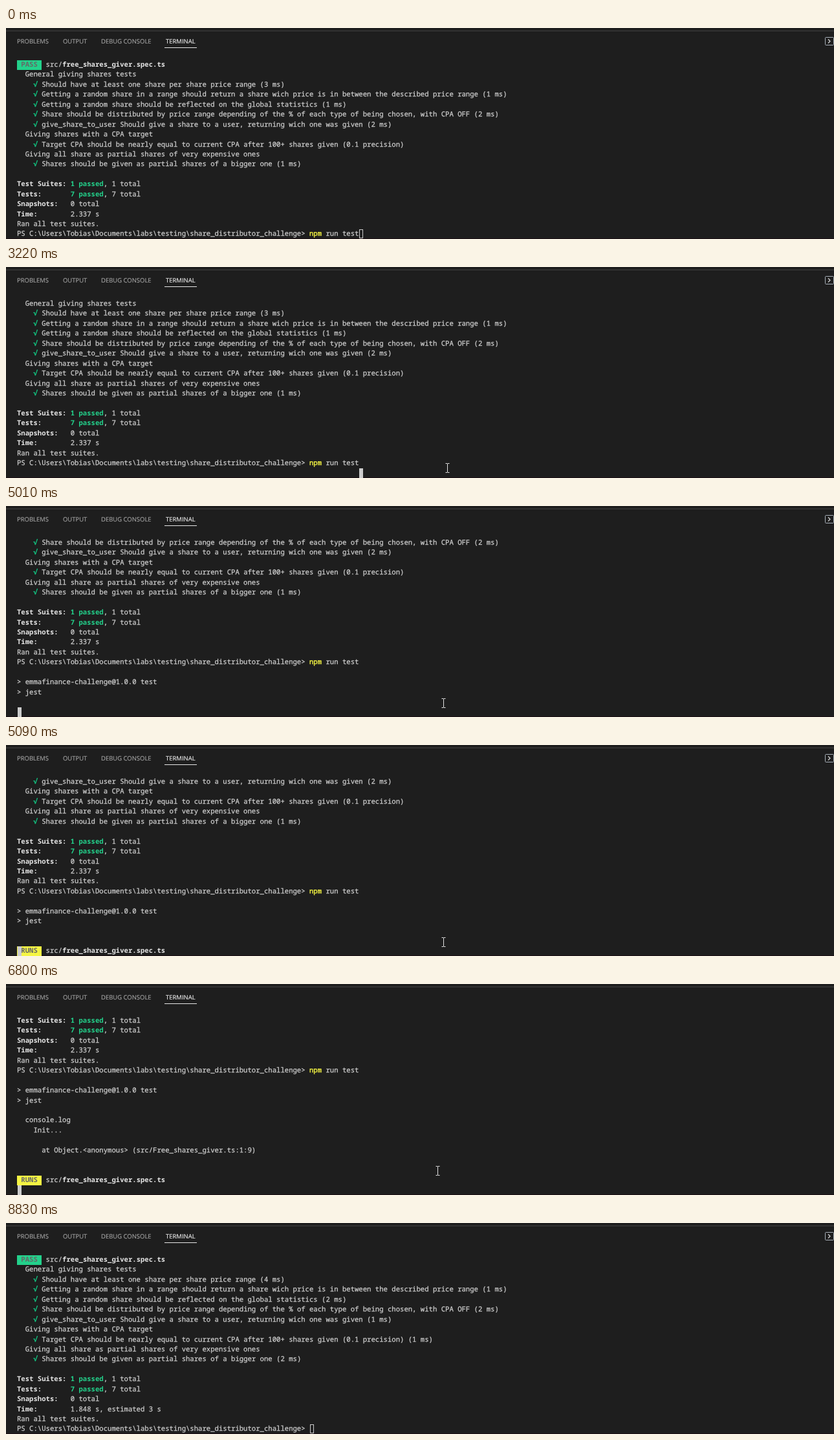
An HTML page for the animation above (8920 ms loop, 1280 by 327 pixels).

```html
<!DOCTYPE html>
<html lang="en">
<head>
<meta charset="utf-8">
<title>Terminal test run</title>
<style>
  html, body { margin: 0; width: 100%; height: 100%; overflow: hidden; background: #1e1e1e; }
  #stage { position: relative; width: 1280px; height: 327px; overflow: hidden; background: #1e1e1e; text-rendering: geometricPrecision; }
  #stage > *, .row { position: absolute; }
  .edge { left: 0; top: 4px; width: 1280px; height: 1px; background: #414141; }
  .foot { left: 0; top: 326px; width: 1280px; height: 1px; background: #1d1014; }
  .tab { top: 14px; font: 9.47px/14px "Open Sans", sans-serif; color: #a4a4a4; white-space: pre; -webkit-text-stroke: .15px; }
  .tab.on { color: #f0f0f0; }
  .mark { left: 245px; top: 30px; width: 50px; height: 1px; background: #e7e7e7; }
  .screen { left: 17px; top: 50px; }
  .row { left: 0; font: 10.61px/15.44px "Noto Sans Mono", monospace; font-variant-ligatures: none; color: #d0d0d0; white-space: pre; -webkit-text-stroke: .25px; }
  b { color: #e5e5e5; -webkit-text-stroke: 0; }
  .ok { color: #23d18b; }
  .tick { color: #12c481; -webkit-text-stroke: .5px; }
  .cmd { color: #f5f543; -webkit-text-stroke: .4px; }
  .badge { display: inline-block; height: 15.44px; color: #666; background: #23d18b; }
  .runs { background: #f5f543; }
  #caret { box-sizing: border-box; top: 312px; width: 6px; height: 15px; background: #ccc; }
  #caret.hollow { background: none; border: 1px solid #ccc; height: 14px; }
  svg { left: 0; top: 0; fill: none; }
</style>
</head>
<body>
<div id="stage">
  <div class="foot"></div>
  <div class="edge"></div>
  <div class="tab" style="left:17px">PROBLEMS</div>
  <div class="tab" style="left:88px">OUTPUT</div>
  <div class="tab" style="left:147px">DEBUG CONSOLE</div>
  <div class="tab on" style="left:247px">TERMINAL</div>
  <div class="mark"></div>
  <div id="caret"></div>
  <svg width="1280" height="327">
    <g id="shell">
      <rect x="1266.5" y="14.5" width="13" height="12" rx="1" stroke="#a9b2ba"/>
      <path d="M1271 17.5l3 3-3 3" stroke="#d8d8d8" stroke-width="1.2"/>
    </g>
    <path id="mouse" d="M-3-7h2.5l.5.5.5-.5H3M0-6.5v13M-3 7h2.5l.5-.5.5.5H3" stroke="#e2e2e2"/>
  </svg>
</div>
<script>
const LOOP = 8920, ROWS = 18, COL = 6.366, ROW = 15.44, LEFT = 17.6;
const stage = document.getElementById('stage');
const caret = document.getElementById('caret');
const mouse = document.getElementById('mouse');
const shell = document.getElementById('shell');

const file = 'src/<b>free_shares_giver.spec.ts</b>';
const badge = (word, kind = '') => `<b class="badge ${kind}"> ${word} </b> ${file}`;
const check = text => `    <span class="tick">√</span> ${text}`;
const prompt = 'PS C:\\Users\\Tobias\\Documents\\labs\\testing\\share_distributor_challenge&gt; ';
const command = prompt + '<span class="cmd">npm</span> run test';

const report = (ms, precise, time) => [
  badge('PASS'),
  '  General giving shares tests',
  check(`Should have at least one share per share price range (${ms[0]} ms)`),
  check('Getting a random share in a range should return a share wich price is in between the described price range (1 ms)'),
  check(`Getting a random share should be reflected on the global statistics (${ms[1]} ms)`),
  check('Share should be distributed by price range depending of the % of each type of being chosen, with CPA OFF (2 ms)'),
  check(`give_share_to_user Should give a share to a user, returning wich one was given (${ms[2]} ms)`),
  '  Giving shares with a CPA target',
  check(`Target CPA should be nearly equal to current CPA after 100+ shares given (0.1 precision)${precise}`),
  '  Giving all share as partial shares of very expensive ones',
  check(`Shares should be given as partial shares of a bigger one (${ms[3]} ms)`),
  '',
  '<b>Test Suites:</b> <b class="ok">1 passed</b>, 1 total',
  '<b>Tests:</b>       <b class="ok">7 passed</b>, 7 total',
  '<b>Snapshots:</b>   0 total',
  `<b>Time:</b>        ${time}`,
  'Ran all test suites.'
];

const before = [...report([3, 1, 2, 1], '', '2.337 s'), command];
const started = [...before, '', '&gt; emmafinance-challenge@1.0.0 test', '&gt; jest', ''];
const running = [...started, '', badge('RUNS', 'runs')];
const log = ['  console.log', '    Init...', '', '      at Object.&lt;anonymous&gt; (src/Free_shares_giver.ts:1:9)', '', ''];
const logged = [...started, ...log, badge('RUNS', 'runs')];
const after = report([4, 2, 1, 2], ' (1 ms)', '1.848 s, estimated 3 s');

// The last 18 lines of a buffer fill the screen.
function screen(lines) {
  const el = document.createElement('div');
  el.className = 'screen';
  el.innerHTML = lines.slice(-ROWS)
    .map((line, i) => `<div class="row" style="top:${(i * ROW).toFixed(2)}px">${line}</div>`).join('');
  stage.insertBefore(el, caret);
  return el;
}

// time, screen
const screens = [
  [0, before],
  [3220, [...before, '']],
  [4150, [...started, '']],
  [5090, running],
  [5160, [...running, '']],
  [6800, [...logged, '']],
  [6880, [...after, '']],
  [6960, [...after, prompt]]
].map(([t, lines]) => [t, screen(lines)]);

// time, column, hollow
const carets = [
  [0, 83, true], [1130, 83, false], [3290, 0, false],
  [6960, 71, false], [8830, 71, true]
];

// time, x, y
const pointer = [
  [0], [340, 689.5, 323.5], [420, 687.5, 321.5],
  [650, 687.5, 319.5], [730, 685.5, 316.5], [800, 683.5, 313.5], [880, 682.5, 311.5],
  [1130, 687.5, 307.5], [1200, 682.5, 311.5],
  [4780, 681.5, 310.5], [4860, 679.5, 308.5], [4930, 677.5, 306.5], [5010, 676.5, 305.5],
  [5470, 671.5, 298.5], [5540, 667.5, 291.5], [5770, 667.5, 290.5], [5850, 667.5, 289.5],
  [7660, 668.5, 294.5], [7740, 671.5, 304.5], [7820, 674.5, 315.5], [7900, 677.5, 325.5], [7980]
];

const at = (steps, t) => steps.findLast(step => step[0] <= t);

function draw(t) {
  const shown = at(screens, t)[1];
  for (const [, el] of screens) el.style.visibility = el === shown ? 'visible' : 'hidden';

  const [, col, hollow] = at(carets, t);
  caret.className = hollow ? 'hollow' : '';
  caret.style.left = LEFT + col * COL + 'px';

  const [, x, y] = at(pointer, t);
  mouse.style.visibility = x ? 'visible' : 'hidden';
  if (x) mouse.setAttribute('transform', `translate(${x} ${y})`);

  shell.style.visibility = t >= 5160 && t < 7660 ? 'hidden' : 'visible';
}

const start = performance.now();
function tick() {
  draw((performance.now() - start) % LOOP);
  requestAnimationFrame(tick);
}
tick();
</script>
</body>
</html>
```
